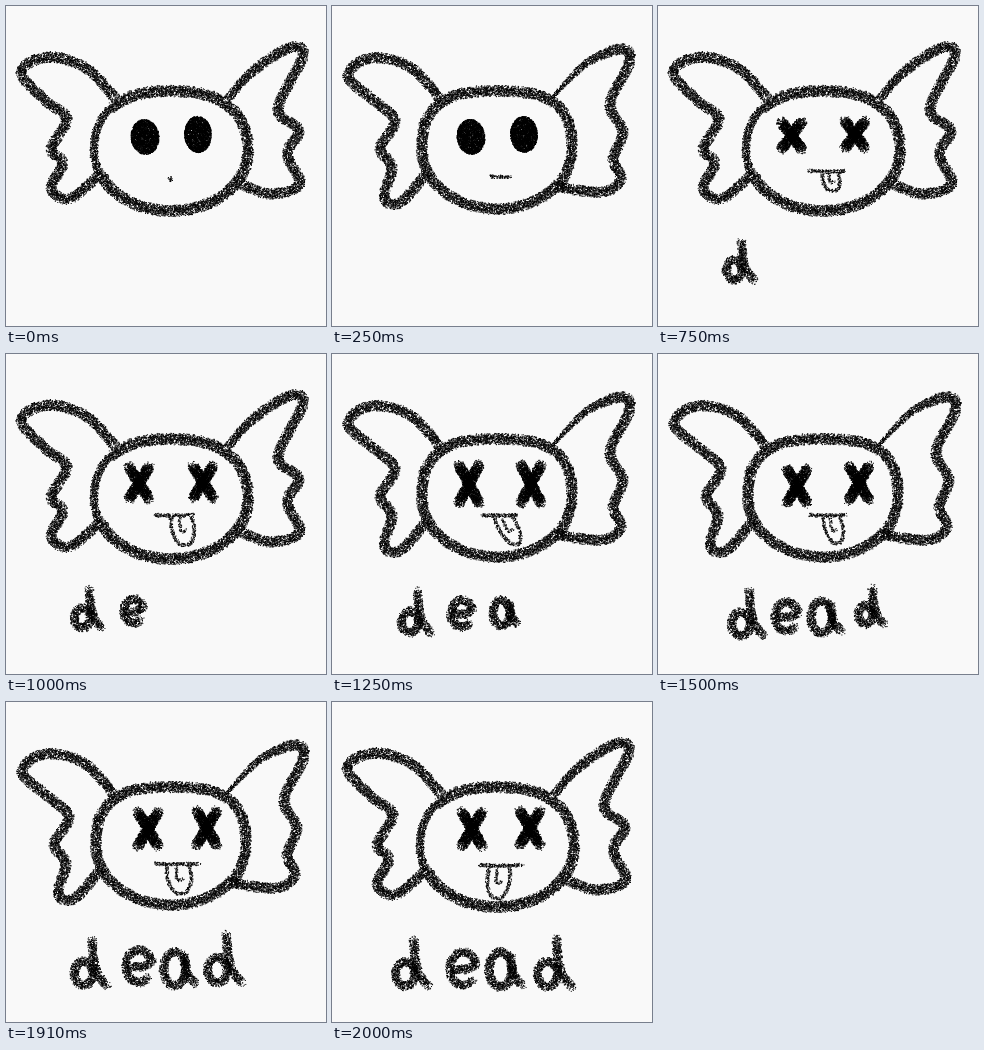
These frames come from a looping animation (320x320 px, 10 s). An HTML page with a canvas:

```html
<!DOCTYPE html>
<html lang="en">
<head>
<meta charset="utf-8">
<title>dead</title>
<style>
html, body { margin: 0; width: 100%; height: 100%; overflow: hidden; background: #f9f9f9; }
canvas { display: block; width: 100vw; height: 100vh; }
</style>
</head>
<body>
<canvas id="stage" width="320" height="320"></canvas>
<script>
const SIZE = 320, LOOP = 10000, FPS = 12, LAST = 24;
const ctx = document.getElementById('stage').getContext('2d');

let state = 1;
const seed = n => { state = n * 7919; };
function rnd() {
  state = (state + 0x6D2B79F5) | 0;
  let t = Math.imul(state ^ (state >>> 15), 1 | state);
  t = (t + Math.imul(t ^ (t >>> 7), 61 | t)) ^ t;
  return ((t ^ (t >>> 14)) >>> 0) / 4294967296;
}

const mix = (a, b, k) => a.map((v, i) => v + (b[i] - v) * k);
const clamp = v => Math.max(0, Math.min(1, v));

// Key lookup with a fractional index
function pose(keys, pos) {
  const p = Math.max(0, Math.min(keys.length - 1, pos)), i = Math.floor(p);
  return mix(keys[i], keys[i + 1] || keys[i], p - i);
}

// Elliptic arc in degrees; a power above 2 squares off the upper half
function arc(cx, cy, rx, ry, from, to, power = 2) {
  const out = [], n = 16;
  for (let i = 0; i <= n; i++) {
    const a = (from + (to - from) * i / n) * Math.PI / 180;
    const c = Math.cos(a), s = Math.sin(a), e = 2 / (s < 0 ? power : 2);
    out.push(cx + rx * Math.sign(c) * Math.abs(c) ** e, cy + ry * Math.sign(s) * Math.abs(s) ** e);
  }
  return out;
}

// Catmull-Rom through flat x,y pairs
function smooth(flat) {
  const p = [], out = [];
  for (let i = 0; i < flat.length; i += 2) p.push([flat[i], flat[i + 1]]);
  for (let i = 0; i < p.length - 1; i++) {
    const a = p[i - 1] || p[i], b = p[i], c = p[i + 1], d = p[i + 2] || c;
    for (let t = 0; t < 1; t += 1 / 8) {
      out.push(b.map((v, k) => v + t / 2 * (c[k] - a[k] +
        t * (2 * a[k] - 5 * v + 4 * c[k] - d[k] + t * (3 * v - a[k] - 3 * c[k] + d[k])))));
    }
  }
  out.push(p[p.length - 1]);
  return out;
}

function grain(g, x, y, r) {
  const a = rnd() * Math.PI * 2, d = r * Math.sqrt(rnd());
  g.fillRect(x + Math.cos(a) * d - 0.5, y + Math.sin(a) * d - 0.5, 1, 1);
}

// Charcoal stroke: specks scattered around the path
function chalk(g, flat, width, { density = 1.3, part = 1, thin = width } = {}) {
  const pts = smooth(flat), n = Math.round((pts.length - 1) * part);
  g.fillStyle = '#000';
  for (let i = 0; i < n; i++) {
    const [x0, y0] = pts[i], [x1, y1] = pts[i + 1];
    const w = thin + (width - thin) * clamp(i / 12);
    const count = Math.floor(Math.hypot(x1 - x0, y1 - y0) * w * density + rnd());
    for (let k = 0; k < count; k++) {
      const t = rnd();
      grain(g, x0 + (x1 - x0) * t, y0 + (y1 - y0) * t, w / 2);
    }
  }
}

function blob(x, y, rx, ry, tilt, density) {
  ctx.save();
  ctx.translate(x, y);
  ctx.rotate(tilt);
  ctx.scale(1, ry / rx);
  ctx.fillStyle = '#000';
  const count = Math.PI * rx * ry * density;
  for (let i = 0; i < count; i++) grain(ctx, 0, 0, rx);
  ctx.restore();
}

const leftEars = [
  [109, 92, 80, 62, 42, 51, 15, 66, 40, 95, 61, 113, 45, 143, 57, 157, 45, 182, 63, 193, 92, 170],
  [108, 93, 78, 61, 38, 52, 16, 70, 40, 93, 63, 115, 48, 142, 60, 161, 52, 191, 68, 197, 94, 168]
];
const rightEars = [
  [222, 93, 246, 66, 283, 42, 297, 50, 272, 103, 293, 124, 281, 148, 294, 178, 264, 188, 235, 178],
  [220, 92, 256, 56, 291, 43, 297, 58, 278, 98, 291, 126, 281, 153, 289, 173, 270, 186, 225, 181]
];

// Eyes: left x, y, right x, y, half height
const eyes = [
  [134, 130, 197, 129, 11],
  [133, 129, 197, 128, 16],
  [137, 130, 199, 130, 19],
  [139, 132, 201, 129, 17],
  [143, 127, 202, 126, 17],
  [140, 127, 198, 126, 17]
];
// Mouth: line left, right, y; tongue left, right, tip x, y
const mouths = [
  [154, 187, 169, 164, 175, 170, 179],
  [148, 188, 161, 165, 186, 179, 192],
  [150, 186, 161, 162, 181, 184, 191],
  [151, 188, 161, 165, 182, 179, 190],
  [150, 194, 161, 163, 186, 180, 190],
  [147, 190, 163, 157, 178, 165, 197]
];

// Letters: x, y, size, one key every three steps up to the last
const word = [
  ['d', [[68, 235, 28], [69, 237, 30], [73, 236, 33], [70, 237, 33], [63, 237, 34]]],
  ['e', [[118, 245, 24], [119, 246, 27], [117, 248, 29], [121, 247, 32], [118, 250, 33]]],
  ['a', [[161, 246, 26], [153, 247, 32], [158, 250, 33], [157, 250, 35]]],
  ['d', [[200, 234, 26], [199, 230, 35], [205, 236, 35]]]
];
const glyphs = {
  d: [arc(0.3, 1.03, 0.28, 0.36, -20, -380), [0.55, 0, 0.6, 0.6, 0.72, 1.05, 1, 1.4]],
  e: [[0.13, 0.52, 0.5, 0.52, ...arc(0.4, 0.5, 0.4, 0.5, -15, -315)]],
  a: [arc(0.33, 0.5, 0.33, 0.5, -30, -380), [0.62, 0.1, 0.68, 0.6, 0.95, 0.95]]
};

const heads = [0, 1].map(i => {
  const layer = document.createElement('canvas');
  layer.width = layer.height = SIZE;
  const g = layer.getContext('2d');
  seed(500 + i);
  if (i === 0) {
    chalk(g, arc(165, 145, 77, 60, -138, 158, 2.4), 12);
    chalk(g, arc(165, 145, 77, 60, 158, 222, 2.4), 8.5);
  } else {
    chalk(g, arc(165, 144, 75, 59, -138, 222, 2.8), 11.5);
  }
  chalk(g, leftEars[i], 11);
  chalk(g, rightEars[i], 11, { thin: i ? 4 : 9 });
  return layer;
});

function drawEyes(step, key) {
  if (step < 4) {
    blob(139, 131, 14, 17.5, -0.12, 3);
    blob(192, 128.5, 13.5, 18, -0.05, 3);
    return;
  }
  const [lx, ly, rx, ry, h] = pose(eyes, key);
  for (const [x, y] of [[lx, ly], [rx, ry]]) {
    for (const w of [10, -10]) chalk(ctx, [x - w, y - h, x + w, y + h], 11.5, { density: 3 });
  }
}

function drawMouth(step, key) {
  if (step === 0) {
    blob(164.5, 173, 2.6, 2.6, 0, 1);
    return;
  }
  const [x0, x1, y, l, r, tx, ty] = pose(mouths, key);
  const line = [x0, y, (x0 + x1) / 2, y + 0.7, x1, y];
  const dot = [164, 173, 164, 173, 164, 173];
  chalk(ctx, mix(dot, line, clamp(step / 5)), 4, { density: 1.1 });
  if (step < 5) return;
  // Points are given along the tongue and across it
  const mid = (l + r) / 2, half = (r - l) / 2, top = y + 2;
  const at = (s, side) => [mid + (tx - mid) * s + side * half, top + (ty - top) * s];
  const shape = [at(0, -1), at(0.5, -1.05), at(0.93, -0.5), at(0.93, 0.5), at(0.5, 1.05), at(0, 1)];
  chalk(ctx, shape.flat(), 4, { density: 0.95 });
  chalk(ctx, [at(0.05, -0.2), at(0.5, -0.2), at(0.45, 0.35)].flat(), 3.2, { density: 0.9 });
}

function drawWord(step) {
  word.forEach(([ch, keys], i) => {
    const part = clamp((step - 6 - 3 * i) / 3);
    const [x, y, size] = pose(keys, keys.length - 1 - (LAST - step) / 3);
    const strokes = glyphs[ch];
    strokes.forEach((s, k) => {
      const pts = s.map((v, j) => v * size + (j % 2 ? y : x));
      chalk(ctx, pts, 9.5, { density: 1.25, part: clamp(part * strokes.length - k) });
    });
  });
}

function draw(step) {
  const key = step < 12 ? (step - 6) / 6 : (step - 9) / 3;
  ctx.fillStyle = '#f9f9f9';
  ctx.fillRect(0, 0, SIZE, SIZE);
  ctx.drawImage(heads[step % 4 < 2 ? 0 : 1], 0, 0);
  seed(step + 1);
  drawEyes(step, key);
  drawMouth(step, key);
  drawWord(step);
}

let shown = -1;
const start = performance.now();
function tick() {
  const t = (performance.now() - start) % LOOP;
  const step = Math.min(LAST, Math.floor(t * FPS / 1000));
  if (step !== shown) draw(shown = step);
  requestAnimationFrame(tick);
}
tick();
</script>
</body>
</html>
```
